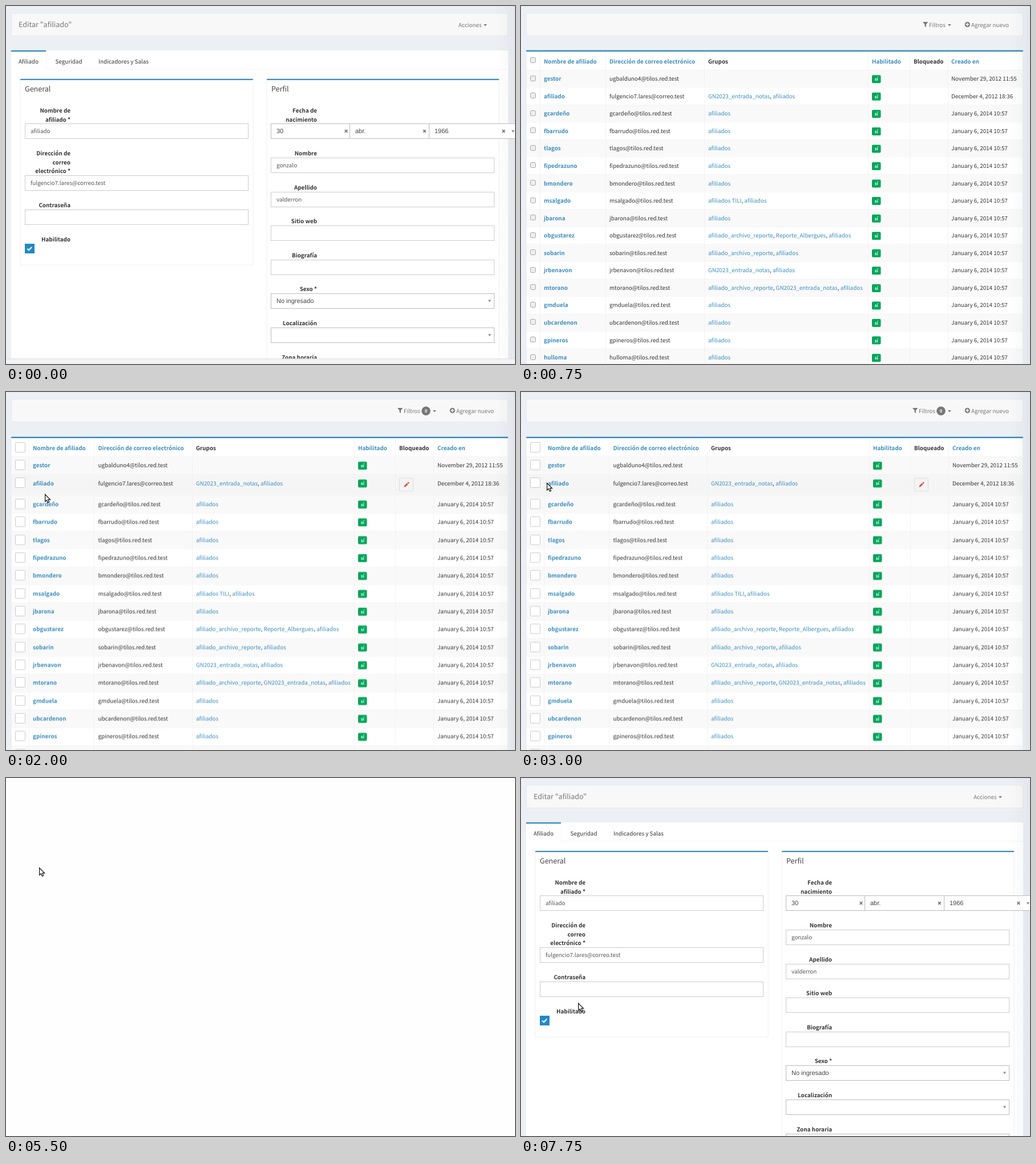
An HTML page that plays this animation: 892x628 px, repeating every 8 s.

```html
<!DOCTYPE html>
<html lang="es">
<head>
<meta charset="utf-8">
<title>Panel de cuentas</title>
<style>
html, body { margin: 0; width: 100%; height: 100%; overflow: hidden; background: #fefefe; }
svg { display: block; width: 892px; height: 628px; }
text {
  font: 9.85px "Noto Sans CJK SC", "Noto Sans CJK JP", "Noto Sans CJK TC", "Noto Sans CJK KR", "Noto Sans CJK", "Open Sans", sans-serif;
  text-rendering: geometricPrecision; white-space: pre; fill: #333;
}
.b { font-weight: 700; }
.link { fill: #3c8dbc; }
.nav { fill: #777; }
.field { fill: #555; }
.big { font-size: 12.55px; fill: #444; }
.brand { font-size: 12.55px; fill: #777; }
.tag { font-size: 7.6px; font-weight: 700; fill: #fff; text-anchor: middle; }
.right { text-anchor: end; }
.pick { font: 11px "Liberation Sans", Arial, sans-serif; fill: #444; }

/* Every state holds until the next one; one loop is 8 s. */
.form, .dark, .plain, .rich, .strip, .ready, .edit0, .edit1, .second, .rest, .hot, .cursor, .arrow, .hand {
  animation: 8s step-end infinite;
}
.form { animation-name: form; }
.dark { animation-name: dark; }
.plain { animation-name: plain; }
.rich { animation-name: rich; }
.strip { animation-name: strip; }
.ready { animation-name: ready; }
.edit0 { animation-name: edit0; }
.edit1 { animation-name: edit1; }
.second { animation-name: second; }
.rest { animation-name: rest; }
.hot { animation-name: hot; }
.cursor { animation-name: move; }
.arrow { animation-name: arrow; }
.hand { animation-name: hand; }
@keyframes form { 0%, 71.875%, 100% { opacity: 1 } 6.25% { opacity: 0 } }
@keyframes dark { 0%, 9.375%, 100% { opacity: 0 } 6.25% { opacity: 1 } }
@keyframes plain { 0%, 12.5%, 100% { opacity: 0 } 9.375% { opacity: 1 } }
@keyframes rich { 0%, 68.75%, 100% { opacity: 0 } 12.5% { opacity: 1 } }
@keyframes strip { 0% { opacity: 1 } 6.25%, 100% { opacity: 0 } }
@keyframes ready { 0%, 75%, 100% { opacity: 1 } 71.875% { opacity: 0 } }
@keyframes edit0 { 0%, 21.875%, 100% { opacity: 0 } 18.75% { opacity: 1 } }
@keyframes edit1 { 0%, 100% { opacity: 0 } 21.875% { opacity: 1 } }
@keyframes second { 0%, 21.875%, 100% { transform: none } 18.75% { transform: translateY(5.4px) } }
@keyframes rest { 0%, 100% { transform: none } 18.75% { transform: translateY(5.4px) } }
@keyframes hot {
  0%, 25%, 37.5%, 100% { fill: #3c8dbc }
  21.875%, 31.25%, 43.75% { fill: #72afd2 }
}
@keyframes arrow {
  0%, 21.875%, 31.25%, 43.75% { opacity: 0 }
  15.625%, 25%, 37.5%, 50%, 100% { opacity: 1 }
}
@keyframes hand {
  0%, 25%, 37.5%, 50%, 100% { opacity: 0 }
  21.875%, 31.25%, 43.75% { opacity: 1 }
}
@keyframes move {
  0%, 15.625% { transform: translate(24px, 61px) }
  18.75% { transform: translate(52px, 128px) }
  21.875% { transform: translate(63px, 158px) }
  25% { transform: translate(68px, 179px) }
  28.125% { transform: translate(74px, 168px) }
  31.25% { transform: translate(65px, 158px) }
  37.5% { transform: translate(45px, 159px) }
  43.75% { transform: translate(59px, 157px) }
  50% { transform: translate(58px, 157px) }
  84.375% { transform: translate(73px, 148px) }
  93.75% { transform: translate(100px, 255px) }
  96.875%, 100% { transform: translate(100px, 394.5px) }
}
</style>
</head>
<body>
<svg id="stage" viewBox="0 0 892 628"></svg>
<script>
const BLUE = '#3c8dbc';
const text = (x, y, s, cls = '') => `<text x="${x}" y="${y + 4}" class="${cls}">${s}</text>`;
const rect = (x, y, w, h, fill, more = '') =>
  `<rect x="${x}" y="${y}" width="${w}" height="${h}" fill="${fill}" ${more}/>`;
const path = (d, fill, more = '') => `<path d="${d}" fill="${fill}" ${more}/>`;
const group = (cls, ...parts) => `<g class="${cls}">${parts.join('')}</g>`;
const outlined = (x, y, w, h, fill, stroke, r = 0) =>
  rect(x + .5, y + .5, w - 1, h - 1, fill, `stroke="${stroke}" rx="${r}"`);
const caret = x => path(`M${x} 32h6l-3 3.2z`, '#777');

const backdrop = () => rect(0, 0, 892, 628, '#ecf0f5') + rect(0, 0, 892, 1, '#e4e8ed')
  + outlined(9, 12, 871, 41, '#f8f8f8', '#e7e7e7', 3);
const edgeShade = () => rect(856, 0, 36, 628, 'url(#edge)');

const GROUPS = {
  a: 'afiliados', g: 'GN2023_entrada_notas', t: 'afiliados TILI',
  r: 'afiliado_archivo_reporte', h: 'Reporte_Albergues'
};
const MEMBERS = [
  ['gestor', '', 'ugbalduno4@tilos.red.test', 'November 29, 2012 11:55'],
  ['afiliado', 'ga', 'fulgencio7.lares@correo.test', 'December 4, 2012 18:36'],
  ['gcardeño', 'a'], ['fbarrudo', 'a'], ['tlagos', 'a'], ['fipedrazuno', 'a'],
  ['bmondero', 'a'], ['msalgado', 'ta'], ['jbarona', 'a'], ['obgustarez', 'rha'],
  ['sobarin', 'ra'], ['jrbenavon', 'ga'], ['mtorano', 'rga'], ['gmduela', 'a'],
  ['ubcardenon', 'a'], ['gpineros', 'a'], ['hulloma', 'a']
];
const HEADS = ['Nombre de afiliado', 'Dirección de correo electrónico', 'Grupos',
  'Habilitado', 'Bloqueado', 'Creado en'];

const PLAIN = { top: 78, pitch: 30.56, cols: [40, 155, 328, 615, 688, 754], lines: [33, 148, 321, 608, 681, 748] };
const RICH = { rich: true, top: 79, pitch: 31.35, cols: [47, 161.5, 333, 617, 689, 756], lines: [40, 154, 326, 610, 682, 749] };

const pencil = y => outlined(689, y - 9, 25, 24, '#f4f4f4', '#ddd', 2)
  + path(`M697.5 ${y + 7.2}l.7-2.6 4.5-4.5 2 2-4.5 4.5zM703.4 ${y - .6}l1-1q.6-.5 1.2 0l.8.8q.5.6 0 1.2l-1 1z`, '#dd4b39');

const tick = (rich, y) => rich
  ? outlined(16, Math.round(y - 9.5), 18, 18, '#fff', '#cacaca', 1)
  : outlined(16, Math.round(y - 6), 10, 10, '#eee', '#a5a5a5', 2);

function row(layout, [name, codes, mail = name + '@tilos.red.test', date = 'January 6, 2014 10:57'], i) {
  const { rich, top, pitch, cols, lines } = layout;
  const y = top + 34 + i * pitch, mid = y + 15.2;
  const tall = rich && i < 2;
  const height = tall ? 37 : pitch;
  const links = [...codes].map(c => `<tspan class="link">${GROUPS[c]}</tspan>`).join(', ');
  return rect(10, y, 869, height, i % 2 ? '#fff' : '#f9f9f9')
    + (tall ? group('edit' + i, rect(10, y, 869, height, '#f5f5f5')) : '')
    + rect(10, y, 869, .8, '#f4f4f4')
    + lines.map(x => rect(x, y, 1, height, '#f2f2f2')).join('')
    + tick(rich, mid + .4)
    + text(cols[0], mid, name, 'b link' + (tall && i ? ' hot' : ''))
    + text(cols[1], mid, mail) + text(cols[2], mid, links)
    + rect(cols[3], mid - 6, 15.5, 14, '#00a65a', 'rx="2"')
    + text(cols[3] + 7.7, mid - .1, 'sí', 'tag')
    + text(cols[5], mid, date)
    + (tall ? group('edit' + i, pencil(mid)) : '');
}

function table(layout) {
  const { rich, top, cols, lines } = layout;
  const shift = rich ? -18 : 0;
  const rows = MEMBERS.map((m, i) => row(layout, m, i));
  return backdrop()
    + path(`M${704 + shift} 28h9.5l-3.6 4.2v5l-2.3-1.8v-3.2z`, '#777')
    + text(715 + shift, 32.5, 'Filtros', 'nav') + caret(748)
    + (rich ? '<circle cx="736" cy="33.2" r="7.8" fill="#777"/>' + text(736, 32.2, '0', 'tag') : '')
    + '<circle cx="782.3" cy="32.4" r="4.6" fill="#777"/>'
    + path('M779.5 32.4h5.6M782.3 29.6v5.6', 'none', 'stroke="#f8f8f8" stroke-width="1.6"')
    + text(789, 32.5, 'Agregar nuevo', 'nav')
    + rect(10, top, 869, 560, '#fff')
    + lines.map(x => rect(x, top, 1, 36, '#f4f4f4')).join('')
    + rect(9, top - .5, 871, 2.5, BLUE, 'rx="1"')
    + tick(rich, top + 18.4)
    + HEADS.map((h, i) => text(cols[i], top + 19, h, 'b' + (i == 2 || i == 4 ? '' : ' link'))).join('')
    + rows[0] + group(rich ? 'second' : '', rows[1]) + group(rich ? 'rest' : '', ...rows.slice(2))
    + edgeShade();
}

const labels = (x, y, ...lines) => lines.map((s, i) => text(x, y + i * 15.6, s, 'b right')).join('');
const input = (x, y, value = '') => outlined(x, y, 392, 27, '#fff', '#ccc') + text(x + 10, y + 13, value, 'field');
const arrowDown = (x, y) => path(`M${x - 2.6} ${y - 1.6}h5.2l-2.6 4z`, '#888');
const select = (x, y, w, value = '') => outlined(x, y, w, 27, '#fff', '#bbb') + text(x + 10, y + 13, value, 'pick');
const cross = x => path(`M${x - 2.3} 217.2l4.6 4.6m0-4.6l-4.6 4.6`, 'none', 'stroke="#777" stroke-width="1.7"');
const panel = (x, w, h, title) => rect(x, 129, w, h, '#fff', 'stroke="#f0f0f0"')
  + rect(x, 127.7, w, 2.4, BLUE, 'rx="1"') + text(x + 8, 146, title, 'big');

function form() {
  const fields = [['Nombre', 'gonzalo'], ['Apellido', 'valderron'], ['Sitio web'], ['Biografía'],
    ['Sexo *', 'No ingresado'], ['Localización', ''], ['Zona horaria', '']];
  return backdrop()
    + text(22, 33, 'Editar "afiliado"', 'brand') + text(793, 32.5, 'Acciones', 'nav') + caret(837)
    + rect(9, 78, 871, 550, '#fff')
    + rect(70, 78, 1, 33, '#f4f4f4') + rect(70, 110.5, 809, 1, '#f4f4f4')
    + rect(9, 77.7, 61, 2.4, BLUE)
    + text(22, 97, 'Afiliado') + text(86.5, 97, 'Seguridad') + text(162, 97, 'Indicadores y Salas')
    + panel(25, 408, 325.5, 'General')
    + labels(113, 183, 'Nombre de', 'afiliado *') + input(33, 206, 'afiliado')
    + labels(113, 258, 'Dirección de', 'correo', 'electrónico *') + input(33, 297, 'fulgencio7.lares@correo.test')
    + labels(113, 349, 'Contraseña') + input(33, 357)
    + labels(113, 408.5, 'Habilitado')
    + outlined(36, 420, 10, 10, '#eee', '#a5a5a5', 2)
    + group('ready', rect(33, 417, 17, 17, '#2489c5'),
        path('M37.3 425.6l2.7 2.7 5.2-5.3', 'none', 'stroke="#fff" stroke-width="2"'))
    + panel(457, 407, 520, 'Perfil')
    + labels(545, 183, 'Fecha de', 'nacimiento')
    + fields.map(([name, value], i) => {
        const y = 258 + i * 59.6, top = Math.round(y + 8);
        const control = i < 4 ? input(464, top, value) : select(464, top, 392, value) + arrowDown(847.5, top + 13);
        return labels(545, y, name) + control;
      }).join('')
    + edgeShade()
    + select(464, 206, 139, '30') + select(602, 206, 140, 'abr.') + select(741, 206, 160, '1966')
    + arrowDown(888.5, 219.5)
    + group('ready', ...[596, 733.5, 872].map(cross))
    + group('strip', rect(0, 619, 892, 9, '#f3f3f3'), rect(0, 618.5, 892, 1, '#dcdcdc'));
}

const cursor = group('arrow', path('M.6.8V13.2l2.8-2.5 2 4.6 2.3-1-2-4.4h3.9z', '#fff', 'stroke="#111" stroke-width="1.2"'))
  + group('hand', path('M-1 1.5q1-1.5 2 0V6q1-.8 2 .3 1.2-.8 2 .4 1.7-.6 2 .9v3.6q-.3 2.3-1.6 4H-.6q-.8-2.3-3-5.4-.4-1.4.8-1.5l1.8 1.5z', '#fff', 'stroke="#111"'));

document.getElementById('stage').innerHTML =
  `<defs><linearGradient id="edge"><stop stop-color="#00000000"/><stop offset=".6" stop-color="#00000005"/>
  <stop offset="1" stop-color="#0000000a"/></linearGradient></defs>`
  + group('form', form())
  + group('dark', rect(0, 0, 892, 628, '#252d33'))
  + group('plain', table(PLAIN))
  + group('rich', table(RICH))
  + `<g id="pointer">${group('cursor', cursor)}</g>`;

// The pointer is off stage until 1250 ms of each loop.
document.getElementById('pointer').animate(
  [{ opacity: 0, easing: 'step-end' }, { opacity: 1, offset: .15625 }, { opacity: 1 }],
  { duration: 8000, iterations: Infinity });
</script>
</body>
</html>
```
